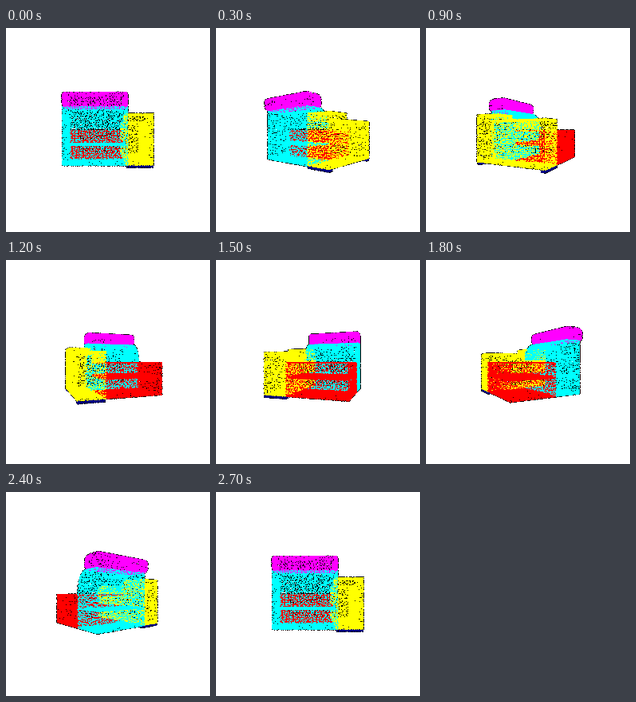
Animation of 256x256 px, one loop 3 s. Source, as an HTML page with a canvas:

```html
<!DOCTYPE html>
<html>
<head>
<meta charset="utf-8">
<style>
html, body { margin: 0; width: 100%; height: 100%; overflow: hidden; background: #fff; }
canvas { display: block; width: 256px; height: 256px; image-rendering: pixelated; }
</style>
</head>
<body>
<canvas id="c" width="256" height="256"></canvas>
<script>
const SIZE = 256, DIST = 222, GAP = 2.2;
const CORE = 0.95, FRINGE = 2.1; // squared splat radii
const ctx = document.getElementById('c').getContext('2d');
const image = ctx.createImageData(SIZE, SIZE);
const pixels = new Uint32Array(image.data.buffer);

// Colours as ABGR
const WHITE = 0xffffffff, BLACK = 0xff000000;
const MAGENTA = 0xffff00ff, CYAN = 0xffffff00, RED = 0xff0000ff;
const YELLOW = 0xff00ffff, NAVY = 0xff800000;

let seed = 7;
const random = () => (seed = (seed * 16807) % 2147483647) / 2147483647;
const clamp = v => Math.min(1, Math.max(0, v));
const points = [];

// Jittered grid over a surface f(u, v) measuring w by h
function patch(color, w, h, f) {
  const nu = Math.max(1, Math.round(w / GAP)), nv = Math.max(1, Math.round(h / GAP));
  const at = (i, n) => clamp((i + (random() - 0.5) * 0.7) / n);
  for (let i = 0; i <= nu; i++)
    for (let j = 0; j <= nv; j++) {
      const p = f(at(i, nu), at(j, nv));
      if (p) points.push([...p, color]);
    }
}

// Faces of a box: lower case is the low side of an axis, upper case the high side
function box(color, [x, X], [y, Y], [z, Z], faces) {
  const w = X - x, h = Y - y, d = Z - z;
  for (const f of faces) {
    if (f === 'x' || f === 'X')
      patch(color, d, h, (u, v) => [f === 'x' ? x : X, y + v * h, z + u * d]);
    else if (f === 'y' || f === 'Y')
      patch(color, w, d, (u, v) => [x + u * w, f === 'y' ? y : Y, z + v * d]);
    else
      patch(color, w, h, (u, v) => [x + u * w, y + v * h, f === 'z' ? z : Z]);
  }
}

const L = -46.5, M = 20, R = 46.5;  // left side, inner arm, outer arm
const BACK = -41, SEAT = -6, FRONT = 45, FLOOR = -36;

// Backrest with a rounded front
const frontZ = y => y < 3 ? SEAT : -22 + 16 * Math.sqrt(Math.max(0, 1 - ((y - 3) / 21) ** 2));
box(CYAN, [L, M], [FLOOR, 24], [BACK, SEAT], 'zy');
box(CYAN, [L, M], [FLOOR, -16], [BACK, SEAT], 'Y');
box(CYAN, [L, M], [FLOOR, 24], [BACK, -22], 'Y');
const side = (x, low) => patch(CYAN, 35, 24 - low, (u, v) => {
  const y = low + v * (24 - low), z = BACK + u * (SEAT - BACK);
  return z <= frontZ(y) && [x, y, z];
});
side(L, FLOOR);
side(M, 17);
patch(CYAN, M - L, 30, (u, v) => {
  const a = v * Math.PI / 2;
  return [L + u * (M - L), 3 + 21 * Math.sin(a), -22 + 16 * Math.cos(a)];
});

// Headrest roll with bulging ends
const bow = v => Math.sign(v) * Math.abs(v) ** 0.65;
const ring = (x, a, r) => [x, 31.2 + 7.8 * r * bow(Math.sin(a)), -32 + 14.5 * r * bow(Math.cos(a))];
const x0 = L + 1.5, x1 = M - 1.5;
patch(MAGENTA, x1 - x0, 80, (u, v) => ring(x0 + u * (x1 - x0), v * 2 * Math.PI, 1));
for (const [x, bulge] of [[x0, -2], [x1, 2]])
  patch(MAGENTA, 13, 50, (u, v) => ring(x + bulge * Math.sqrt(1 - u), v * 2 * Math.PI, Math.sqrt(u)));

// Two seat cushions, open towards the back and the arm
box(RED, [L, M - 1], [-15.5, -1], [SEAT, FRONT], 'xyYZ');
box(RED, [L, M - 1], [FLOOR, -17], [SEAT, FRONT], 'xyYZ');

// Stepped arm
const STEP = -10, LOW = 10.2, HIGH = 16.8, END = -39.5;
box(YELLOW, [M - 1, R], [FLOOR, LOW], [END, FRONT], 'XyZ');
box(YELLOW, [M - 1, R], [FLOOR, HIGH], [END, STEP], 'z');
box(YELLOW, [M - 1, R], [FLOOR, LOW], [STEP, FRONT], 'Y');
box(YELLOW, [M - 1, R], [LOW, HIGH], [END, STEP], 'xXYZ');
box(YELLOW, [M - 1, R], [-1, LOW], [SEAT, FRONT], 'x');

// Feet
for (const z of [-39, 41])
  box(NAVY, [M, R - 0.5], [-38.5, -37], [z, z + 4], 'xXyzZ');

function draw(angle) {
  const cos = Math.cos(angle), sin = Math.sin(angle);
  const seen = points.map(([x, y, z, color]) => {
    const depth = z * cos - x * sin, s = DIST / (DIST + depth);
    return [128 + s * (x * cos + z * sin), 128 - s * y, depth, color];
  }).sort((a, b) => b[2] - a[2]);
  pixels.fill(WHITE);
  for (const [x, y, , color] of seen) {
    const cx = Math.floor(x), cy = Math.floor(y);
    for (let py = cy - 2; py <= cy + 2; py++)
      for (let px = cx - 2; px <= cx + 2; px++) {
        const d = (px + 0.5 - x) ** 2 + (py + 0.5 - y) ** 2, i = py * SIZE + px;
        if (d < CORE) pixels[i] = color;
        else if (d < FRINGE && pixels[i] === WHITE) pixels[i] = BLACK;
      }
  }
  ctx.putImageData(image, 0, 0);
}

// Nine turns of 40 degrees; the tenth pose repeats the first
let shown = -1;
function tick() {
  const step = Math.floor(performance.now() % 3000 / 300);
  if (step !== shown) {
    shown = step;
    draw(step * Math.PI * 2 / 9);
  }
  requestAnimationFrame(tick);
}
tick();
</script>
</body>
</html>
```
